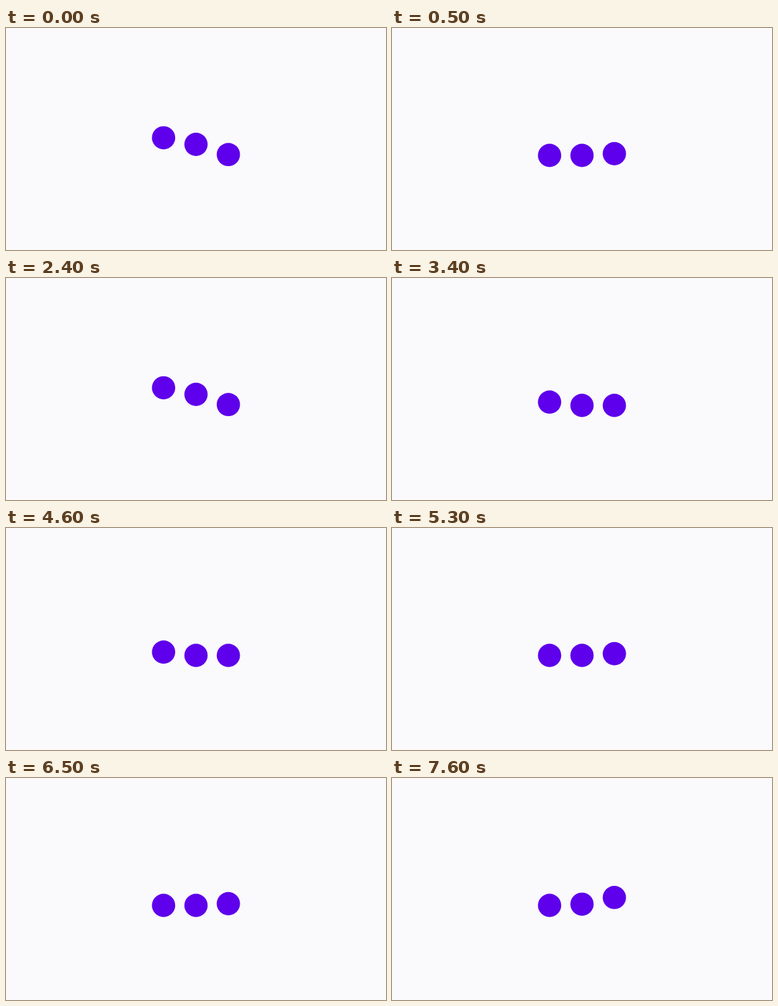
Recreate the animation shown at these times as an HTML page. Size 600x352 px, loop 7.7 s.

```html
<!DOCTYPE html>
<html lang="en">
<head>
<meta charset="utf-8">
<title>Bouncing dots</title>
<style>
  html, body { margin: 0; width: 100%; height: 100%; overflow: hidden; background: #faf9fc; }
  svg { display: block; width: 100%; height: 100%; }
</style>
</head>
<body>
<svg viewBox="0 0 600 352" fill="#5e00eb">
  <circle cx="248.8" cy="202" r="18.4"/>
  <circle cx="300" cy="202" r="18.4"/>
  <circle cx="351.1" cy="202" r="18.4"/>
</svg>
<script>
const LOOP = 7700, STEP = 100, CYCLE = 1200;
const START = -232, STAGGER = 112, RISE = 290, FALL = 290;
const REST = 202, HEIGHT = 29.8;
const dots = document.querySelectorAll('circle');

// cubic-bezier(0, 0, .58, 1)
function easeOut(x) {
  let lo = 0, hi = 1;
  for (let i = 0; i < 24; i++) {
    const u = (lo + hi) / 2;
    if (1.74 * (1 - u) * u * u + u ** 3 < x) lo = u; else hi = u;
  }
  return 3 * (1 - lo) * lo * lo + lo ** 3;
}

function lift(t) {
  if (t < RISE) return easeOut(t / RISE);
  if (t < RISE + FALL) return 1 - easeOut((t - RISE) / FALL);
  return 0;
}

function draw(time) {
  // The motion is held for each step, and the loop cuts hard mid-cycle.
  const t = Math.floor((time % LOOP) / STEP) * STEP;
  dots.forEach((dot, i) => {
    const local = (t - START - i * STAGGER + CYCLE) % CYCLE;
    dot.setAttribute('cy', (REST - HEIGHT * lift(local)).toFixed(2));
  });
}

const begin = performance.now();
function tick() {
  draw(performance.now() - begin + 5);
  requestAnimationFrame(tick);
}
tick();
</script>
</body>
</html>
```
